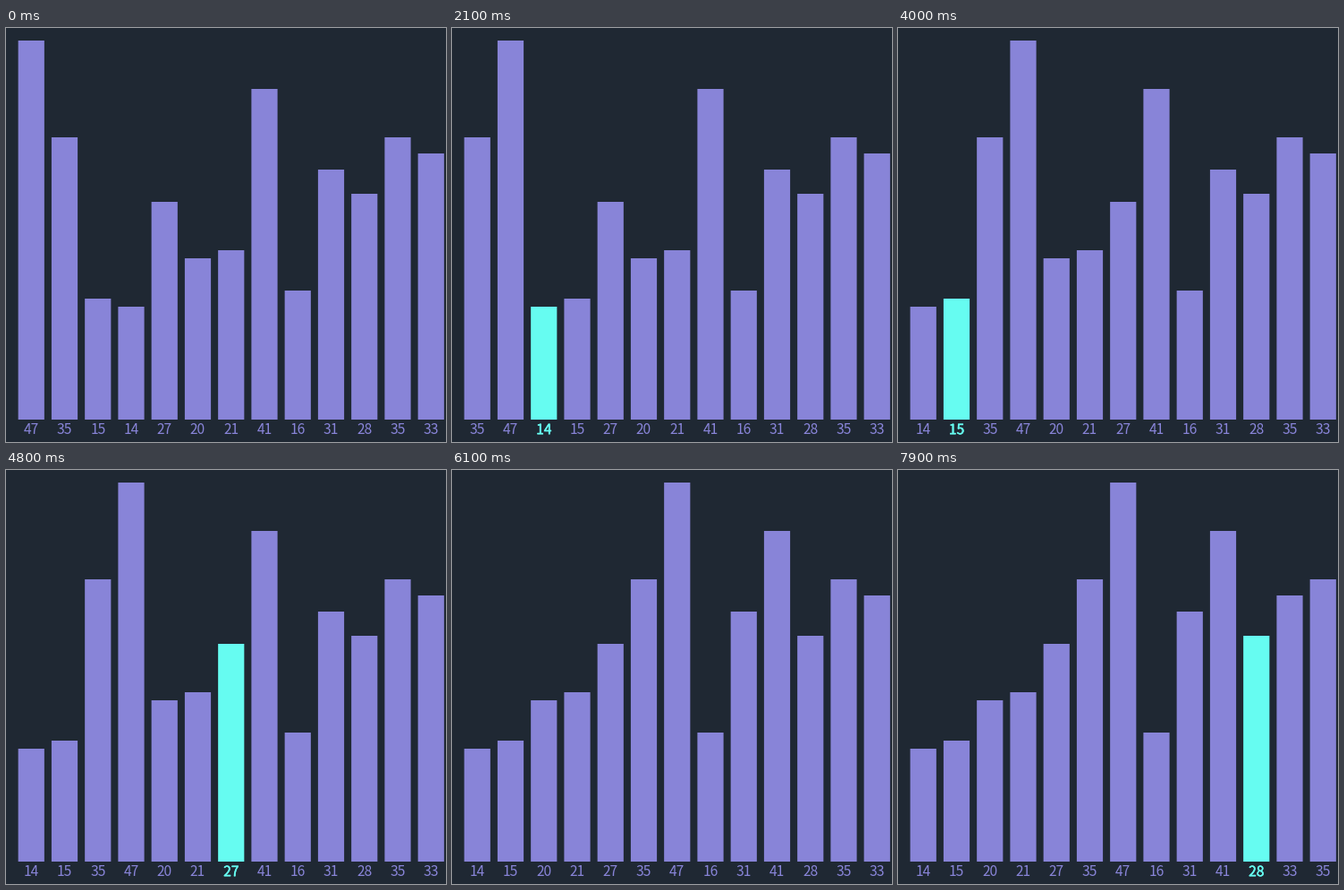
Animation, 492 px wide and 462 px high, one loop 8000 ms. Source, as a matplotlib script:

```python
import matplotlib.pyplot as plt
from matplotlib.animation import FuncAnimation
from matplotlib.patches import Rectangle
from matplotlib.patheffects import Normal, Stroke

W, H, DPI = 492, 462, 100
FRAME_MS, FRAMES = 100, 80
START_MS, VISIT_MS, PAUSE_MS = 620, 160, 200

BACK, BAR, ACTIVE = "#1f2833", "#8884d8", "#66fcf1"
LEFT, PITCH, BAR_W = 13.65, 37.25, 29.2
BASE, UNIT = 437, 9
LABEL_Y, LABEL_PX = 453.2, 15.6

VALUES = [47, 35, 15, 14, 27, 20, 21, 41, 16, 31, 28, 35, 33]


def build_timeline(values):
    """Merge sort as a list of (start ms, values, active index)."""
    data = list(values)
    events = [(0, tuple(data), None)]
    clock = START_MS

    def sort(lo, hi):
        nonlocal clock
        if lo == hi:
            return
        mid = (lo + hi) // 2
        sort(lo, mid)
        sort(mid + 1, hi)
        for i in range(lo, hi + 1):
            events.append((clock, tuple(data), i))
            clock += VISIT_MS
        data[lo:hi + 1] = sorted(data[lo:hi + 1])
        events.append((clock, tuple(data), None))
        clock += PAUSE_MS

    sort(0, len(data) - 1)
    return events


TIMELINE = build_timeline(VALUES)

fig = plt.figure(figsize=(W / DPI, H / DPI), dpi=DPI, facecolor=BACK)
ax = fig.add_axes([0, 0, 1, 1])
ax.set_xlim(0, W)
ax.set_ylim(H, 0)
ax.axis("off")

bars, labels = [], []
for i in range(len(VALUES)):
    x = LEFT + i * PITCH
    bar = Rectangle((x, BASE), BAR_W, 0, linewidth=0, snap=False)
    bars.append(ax.add_patch(bar))
    labels.append(ax.text(x + BAR_W / 2, LABEL_Y, "", ha="center",
                          va="baseline", family="Noto Sans CJK JP",
                          fontsize=LABEL_PX * 72 / DPI))

# The active label looks slightly heavier.
GLOW = [Stroke(linewidth=0.35, foreground=ACTIVE), Normal()]


def draw(frame):
    now = frame * FRAME_MS
    _, values, active = [e for e in TIMELINE if e[0] <= now][-1]
    for i, (bar, label, value) in enumerate(zip(bars, labels, values)):
        color = ACTIVE if i == active else BAR
        bar.set_height(-UNIT * value)
        bar.set_facecolor(color)
        label.set_text(str(value))
        label.set_color(color)
        label.set_path_effects(GLOW if i == active else [])
    return bars + labels


anim = FuncAnimation(fig, draw, frames=FRAMES, interval=FRAME_MS,
                     init_func=lambda: draw(0), repeat=True)
plt.show()
```
